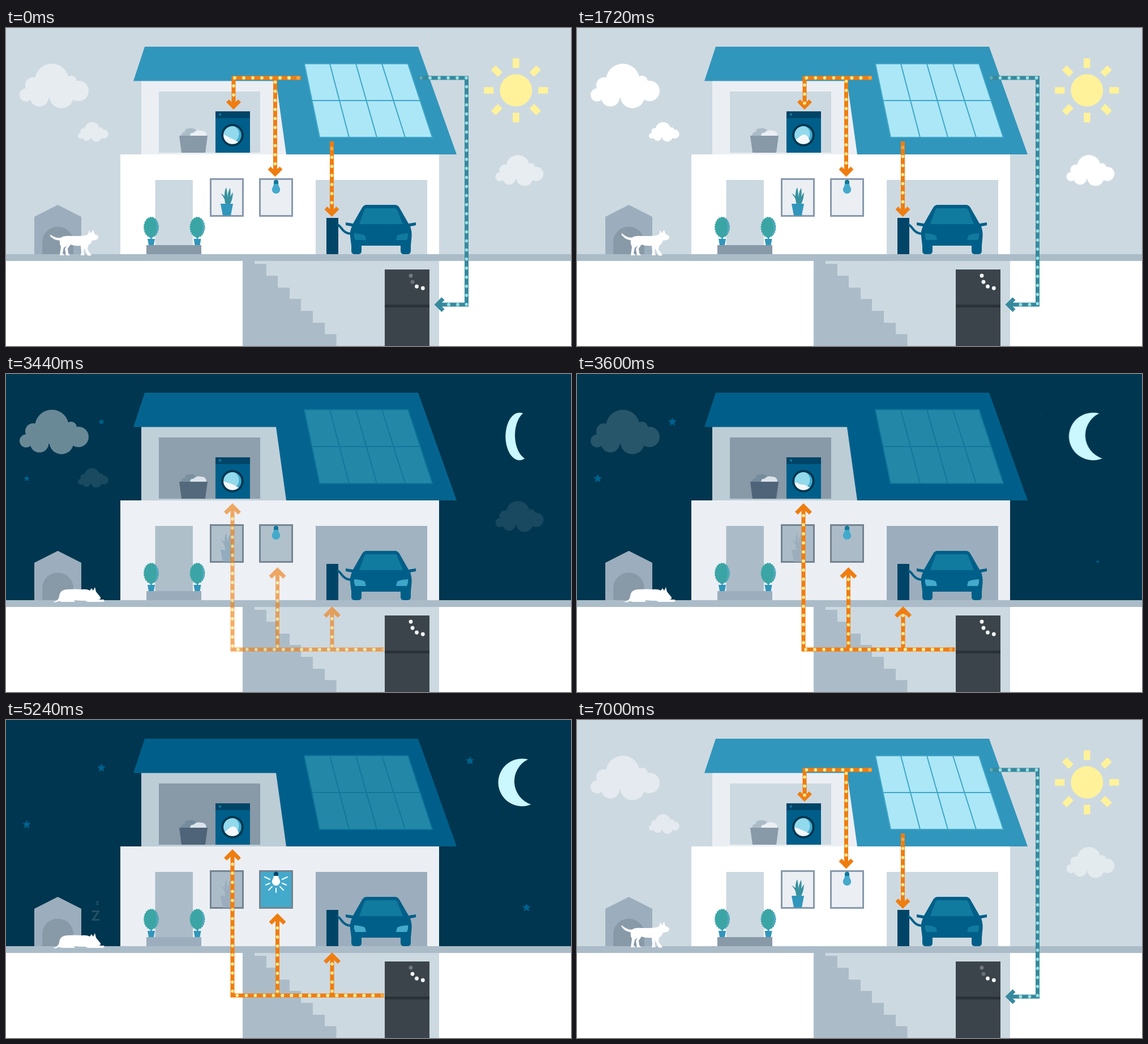
These frames come from a looping animation (998x561 px, 7.04 s). An HTML page without scripts:

```html
<!DOCTYPE html>
<html lang="en">
<head>
<meta charset="utf-8">
<title>Solar house, day and night</title>
<style>
html, body { margin: 0; width: 100%; height: 100%; overflow: hidden; background: #fff; }
svg { display: block; width: 100vw; height: 100vh; }

/* --d / --k: day and night fill, --ds / --ks: day and night stroke */
.sky, .tint, .edge, .panel, .cloud, .day, .night, .stand, .lie, .lit,
.sun, .moon, .star, .stars, .early, .z, .l1, .l2 { animation: 7.04s linear infinite both; }
.sky { animation-name: sky; }
.tint { animation-name: tint; }
.edge { animation-name: tint, edge; }
.panel { animation-name: panel; }
.cloud { animation-name: cloud; }
.cloud.quick { animation-name: quick; }
.day { animation-name: day; }
.night { animation-name: night; }
.stand { animation-name: stand; }
.lie { animation-name: lie; }
.lit { animation-name: lit; }
.sun { animation-name: sun; transform-origin: 900.5px 110px; }
.moon { animation-name: moon; transform-origin: 900.5px 110px; }
.star { animation-name: pop; }
.stars { animation-name: dawn; }
.early { animation-name: early; }
.z { animation-name: doze; }
.l1 { animation-name: led1; }
.l2 { animation-name: led2; }

@keyframes sky { 0%, 43.2% { fill: #cdd9e1; } 47.7%, 89.2% { fill: #00364f; } 92.4%, 100% { fill: #cdd9e1; } }
@keyframes tint { 0%, 43.75% { fill: var(--d); } 49.4%, 90.9% { fill: var(--k); } 96%, 100% { fill: var(--d); } }
@keyframes edge { 0%, 43.75% { stroke: var(--ds); } 49.4%, 90.9% { stroke: var(--ks); } 96%, 100% { stroke: var(--ds); } }
@keyframes panel {
  0%, 43.2% { fill: #ace7f7; stroke: #3fa6c8; }
  48.5%, 87.5% { fill: #2387a8; stroke: #10789c; }
  89.6%, 90.4% { fill: #43aacc; stroke: #2387a8; }
  95%, 100% { fill: #ace7f7; stroke: #3fa6c8; }
}
@keyframes cloud { 0% { opacity: .52; } 5.1%, 43.75% { opacity: 1; } 52.5%, 94.3% { opacity: 0; } 100% { opacity: .52; } }
@keyframes quick { 0% { opacity: .52; } 5.1%, 43.2% { opacity: 1; } 49.5%, 94.3% { opacity: 0; } 100% { opacity: .52; } }
@keyframes day { 0%, 43.2% { opacity: 1; } 46%, 94.3% { opacity: 0; } 98%, 100% { opacity: 1; } }
@keyframes night { 0%, 46.5% { opacity: 0; } 50.2%, 90.2% { opacity: 1; } 93.2%, 100% { opacity: 0; } }
@keyframes stand { 0%, 45.5% { opacity: 1; } 46.6%, 93.2% { opacity: 0; } 94.3%, 100% { opacity: 1; } }
@keyframes lie { 0%, 45.5% { opacity: 0; } 46.6%, 93.2% { opacity: 1; } 94.3%, 100% { opacity: 0; } }
@keyframes lit { 0%, 56.2% { opacity: 0; } 57.4%, 92% { opacity: 1; } 93.2%, 100% { opacity: 0; } }
@keyframes sun { 0%, 43.2% { transform: none; } 46.6%, 90.5% { transform: scaleX(0); } 95.5%, 100% { transform: none; } }
@keyframes moon {
  0%, 46.6% { transform: scaleX(0); }
  50.6% { transform: scaleX(1.03); }
  52%, 87.5% { transform: none; }
  90.5%, 100% { transform: scaleX(0); }
}
@keyframes pop { 0%, 46.9% { transform: scale(0); } 49.7%, 95% { transform: none; } 95.1%, 100% { transform: scale(0); } }
@keyframes dawn { 0%, 90.3% { opacity: 1; } 92.3%, 100% { opacity: 0; } }
@keyframes early { 0%, 87% { opacity: 1; } 89.2%, 100% { opacity: 0; } }
@keyframes doze {
  0%, 60% { opacity: 0; transform: translateY(14px); }
  66% { opacity: .5; }
  74.4% { opacity: .14; transform: none; }
  78%, 100% { opacity: 0; transform: translateY(-8px); }
}
@keyframes led1 { 0%, 16.5% { opacity: .3; } 17.6%, 63% { opacity: 1; } 65%, 100% { opacity: .3; } }
@keyframes led2 { 0%, 8% { opacity: .25; } 9.5%, 80% { opacity: 1; } 82%, 100% { opacity: .25; } }

.wire { fill: none; stroke: #ef7d10; stroke-width: 7; }
.teal .wire { stroke: #378a9e; }
.dots {
  fill: none; stroke: #fde88e; stroke-width: 5.8; stroke-linecap: round; stroke-dasharray: 0 16;
  animation: flow .44s linear infinite;
}
.teal .dots { stroke: #98dfe4; }
.fade { opacity: .6; }
@keyframes flow { from { stroke-dashoffset: var(--o); } to { stroke-dashoffset: calc(var(--o) - 16px); } }

.tail { transform-origin: 98px 371px; animation: wag .176s -.06s ease-in-out infinite alternate; }
@keyframes wag { from { transform: rotate(15deg); } to { transform: rotate(-17deg); } }

.wash { animation: wash 1.17333s linear infinite; }
@keyframes wash {
  0%, 100% { d: path("M383 188C390 190 393 193 398 195C403 197 408 200 417 204V212H383Z"); }
  6.8% { d: path("M383 191C388 190 392 195 398 195C404 195 408 200 417 202V212H383Z"); }
  38.6% { d: path("M383 204C390 204 392 190 402 188C408 187 409 198 411 210V212H383Z"); }
  46.6% { d: path("M383 200C390 196 393 190 400 188C407 187 410 195 413 206V212H383Z"); }
  55.7% { d: path("M383 199C390 197 393 188 400 188C407 188 410 197 417 199V212H383Z"); }
}
</style>
</head>
<body>
<svg viewBox="0 0 998 561" preserveAspectRatio="none">
<defs>
  <g id="cloud">
    <circle cx="57" cy="30" r="30"/><circle cx="24" cy="38" r="14"/><circle cx="11.5" cy="55" r="11.5"/>
    <circle cx="35" cy="59" r="16.5"/><circle cx="74" cy="57" r="21.5"/><circle cx="104" cy="48" r="18"/>
    <circle cx="91" cy="31" r="10"/><path d="M20 34H100V60H14Z"/>
  </g>
  <path id="star" d="M0-8 2.2-2.9 7.6-2.5 3.5 1.1 4.7 6.5 0 3.7-4.7 6.5-3.5 1.1-7.6-2.5-2.2-2.9Z"/>
  <rect id="ray" x="895" y="53.5" width="11.5" height="17"/>
  <g id="tree">
    <g class="edge" style="--d:#3ba5a5;--k:#8899a8;--ds:#3ba5a5;--ks:#8899a8">
      <ellipse rx="12" ry="17" cy="351.5"/>
      <ellipse rx="12" ry="17" cy="351.5" stroke-width="3.4" stroke-linecap="round" stroke-dasharray="0 4.2"/>
    </g>
    <path class="edge" style="--d:#55a9c0;--k:#9caebd;--ds:#55a9c0;--ks:#9caebd" d="M7 337Q18 351 7 366Q13 351 7 337Z" stroke-width="1.5" stroke-dasharray="2 2"/>
    <path class="tint" style="--d:#3196bb;--k:#8899a8" d="M-1.2 368H1.2V372H6.5L4.5 383H-4.5L-6.5 372H-1.2Z"/>
  </g>
  <clipPath id="drum"><circle cx="400" cy="189" r="15.8"/></clipPath>
</defs>

<rect class="sky" width="998" height="400"/>

<g class="stars" fill="#00628f">
  <g transform="translate(36.500 184.500)"><use class="star" href="#star"/></g>
  <g class="early"><g transform="translate(168.500 84.500)"><use class="star" href="#star"/></g></g>
  <g transform="translate(919.500 331)"><use class="star" href="#star" style="animation-delay:.22s"/></g>
  <g transform="translate(819.500 72)"><use class="star" href="#star" style="animation-delay:.27s"/></g>
</g>

<g fill="#fff">
  <g class="cloud"><use href="#cloud" x="24" y="63"/></g>
  <g class="cloud quick"><use href="#cloud" transform="translate(127 166) scale(.44)"/></g>
  <g class="cloud quick"><use href="#cloud" transform="translate(864.500 224) scale(.695)"/></g>
</g>

<g class="sun" fill="#fff29a">
  <circle cx="900.8" cy="110" r="28.5"/>
  <use href="#ray"/>
  <use href="#ray" transform="rotate(45 900.800 110)"/>
  <use href="#ray" transform="rotate(90 900.800 110)"/>
  <use href="#ray" transform="rotate(135 900.800 110)"/>
  <use href="#ray" transform="rotate(180 900.800 110)"/>
  <use href="#ray" transform="rotate(225 900.800 110)"/>
  <use href="#ray" transform="rotate(270 900.800 110)"/>
  <use href="#ray" transform="rotate(315 900.800 110)"/>
</g>
<path class="moon" fill="#cbf7ff" d="M922 69.500A42 42 0 1 0 927.500 149A43 43 0 0 1 922 69.500Z"/>

<!-- ground and basement -->
<rect y="411" width="998" height="150" fill="#fff"/>
<rect y="399" width="998" height="12" fill="#abbcc8"/>
<rect x="418" y="411" width="347" height="150" fill="#cdd9e1"/>
<path fill="#abbcc8" d="M418 411H439V416H460V437H480V458H501V478H521V499H542V520H563V540H583.500V561H418Z"/>
<rect x="669" y="426" width="79" height="135" fill="#3c444b"/>
<rect x="669" y="488" width="79" height="5" fill="#2a3238"/>
<g fill="#f3f7fa">
  <circle class="l1" cx="715" cy="437" r="3.4"/>
  <circle class="l2" cx="718" cy="448" r="3.4"/>
  <circle cx="725.500" cy="456" r="3.4"/>
  <circle cx="736.300" cy="459" r="3.4"/>
</g>

<!-- kennel -->
<path fill="#9caebd" d="M50 333 91.500 312 133 333V399H50Z"/>
<path fill="#8899a8" d="M64 399V378A27.500 27.500 0 0 1 119 378V399Z"/>

<!-- house -->
<path class="tint" style="--d:#ebeff4;--k:#bccdd6" d="M239 93H479L496 224H239Z"/>
<rect class="tint" style="--d:#cdd9e1;--k:#8899a8" x="270" y="112" width="179" height="108"/>
<rect class="tint" style="--d:#fff;--k:#ebeff4" x="202" y="223" width="563" height="176"/>
<path class="tint" style="--d:#3196bb;--k:#005f8a" d="M245 33H728L796 223H495L477 93.500H225Z"/>
<path class="panel" stroke-width="2" d="M527 63H710L753 193H554ZM541 128H731M572 63 606 193M618 63 655 193M664 63 705 193"/>

<!-- laundry room -->
<path class="tint" style="--d:#abbcc8;--k:#748c9c" d="M309 190Q310 184 316 183Q315 177 324 177Q333 176 336 181L345 190Z"/>
<path class="tint" style="--d:#ebeff4;--k:#dbe3ea" d="M325 190Q326 184 331 185Q336 179 344 181Q354 181 354 190Z"/>
<path class="tint" style="--d:#8899a8;--k:#4f6478" d="M306 190H356L352 220H310Z"/>
<rect x="370" y="147" width="61" height="73" fill="#005f8a"/>
<rect x="370" y="147" width="61" height="12" fill="#004568"/>
<circle cx="378" cy="152.500" r="2.200" fill="#117a9f"/>
<circle cx="400" cy="189" r="19.800" fill="#00364f"/>
<g clip-path="url(#drum)">
  <rect x="383" y="172" width="34" height="34" fill="#43aacc"/>
  <circle cx="396" cy="187" r="15.500" fill="#93d9ec"/>
  <path class="wash" fill="#f4f8fb" d="M383 188C390 190 393 193 398 195C403 197 408 200 417 204V212H383Z"/>
</g>

<!-- entrance -->
<rect class="tint" style="--d:#cdd9e1;--k:#abbcc8" x="263.500" y="268" width="66.500" height="116"/>
<rect class="tint" style="--d:#8899a8;--k:#9caebd" x="248" y="383" width="97" height="16"/>
<use href="#tree" x="256.500"/>
<use href="#tree" x="338"/>

<!-- windows -->
<g class="edge" style="--d:#ebeff4;--k:#abbcc8;--ds:#8899ab;--ks:#748390" stroke-width="3">
  <rect x="361.500" y="266.500" width="57" height="65"/>
  <rect x="448.500" y="266.500" width="57" height="65"/>
</g>
<path class="tint" style="--d:#38919f;--k:#9caebd" d="M388 310Q386 298 379 292Q389 295 390 310ZM387 309Q384 290 389 281Q392 294 391 310ZM391 310Q390 292 396 282Q398 296 394 310ZM393 310Q394 298 401 290Q400 304 396 310Z"/>
<path class="tint" style="--d:#3196bb;--k:#9caebd" d="M379 310H401L397 331H383Z"/>
<path id="bulb" fill="#43aacc" d="M473 274H481Q481 278 483 281A7.200 7.200 0 1 1 471 281Q473 278 473 274Z"/>
<path fill="#10789c" d="M473 275V270Q477 265 481 270V275Z"/>
<g class="lit">
  <rect x="450" y="268" width="54" height="62" fill="#43aacc"/>
  <path fill="#fff" d="M473 274H481Q481 278 483 281A7.200 7.200 0 1 1 471 281Q473 278 473 274Z"/>
  <path fill="#004568" d="M473 275V270Q477 265 481 270V275Z"/>
  <path stroke="#fff" stroke-width="2" stroke-linecap="round" d="M477 297V304M470 294 464 300M484 294 490 300M466 288 459 291M488 288 495 291M466 281 457 277M488 281 497 277"/>
</g>

<!-- garage -->
<rect class="tint" style="--d:#cdd9e1;--k:#9caebd" x="547" y="268" width="197" height="131"/>
<rect x="566" y="335" width="21" height="64" fill="#004568"/>
<path d="M585 347C593 348 592 363 612 363" fill="none" stroke="#005f88" stroke-width="4"/>
<path fill="#005f88" d="M637 312H687Q692 312 695 317L711 345 724 343V348L714 350Q717 358 716.500 368L715 384V393Q715 399 709 399H703Q697 399 697 393V384H628V393Q628 399 622 399H616Q610 399 610 393V384L608 368Q607 358 611 350L600 348V343L613 345 629 317Q632 312 637 312Z"/>
<path fill="#117a9f" d="M637 318H687Q690 318 691 321L701 346H624L633 321Q634 318 637 318Z"/>
<path class="tint" style="--d:#117a9f;--k:#43aacc" d="M615 362Q629 363 634 366L636 374H617Q614 368 615 362ZM710 362Q696 363 691 366L689 374H708Q711 368 710 362Z"/>

<!-- dog -->
<g class="stand" fill="#fff">
  <path class="tail" d="M100 369C90 373 84 370 78 367L77 369C83 374 90 377 100 374Z"/>
  <path d="M96 371C101 365 112 367 122 367C132 367 139 367 145 364L147 357 150 362 154 356 156 363 163 367Q164 372 159 374L152 375Q150 381 145 384L144 391 149 398Q152 401 149 401.500H144L138 388 137 396 139 401H132L133 395 132 384Q121 385 114 382L109 389 110 397 113 401H106L104 390 107 384 102 388 100 397 103 401H95L97 386Q93 378 96 371Z"/>
</g>
<g class="lie">
  <path fill="#fff" d="M83 402Q93 400 94 392Q95 381 107 380Q122 379 134 380Q143 379 148 382L151 378 154 382 157 376 159 384 167 394Q168 398 162 398L173 398Q175 401 171 402H144Q140 399 135 400L120 399 122 402H98Q95 400 92 401Q88 404 83 402Z"/>
</g>
<g fill="#fff" font-family="Inter, 'Open Sans', sans-serif" font-weight="700" text-anchor="middle">
  <text class="z" x="158.500" y="354" font-size="24">Z</text>
  <text class="z" x="161.500" y="325" font-size="11" style="animation-delay:.04s">z</text>
</g>

<!-- power by day -->
<g class="day">
  <path class="wire" d="M521 88H402V138M475.500 88V256M575.500 200V326"/>
  <path class="wire" stroke-width="6" d="M391.500 128.500 402 139 412.500 128.500M465 247 475.500 257.500 486 247M565 317.500 575.500 328 586 317.500"/>
  <g style="--o:-5px">
    <path class="dots" d="M521 88H402V134"/>
    <path class="dots" d="M521 88H475.500V251"/>
    <path class="dots" style="--o:-12px" d="M575.500 200V321"/>
  </g>
  <path class="wire fade" d="M521 88H508M575.500 200V214"/>
  <g class="teal">
    <path class="wire" d="M728 88H813.500V488H764M772 477.500 761.500 488 772 498.500"/>
    <path class="dots" style="--o:-5px" d="M728 88H813.500V488H770"/>
    <path class="wire fade" d="M728 88H741"/>
  </g>
</g>

<!-- power by night -->
<g class="night">
  <path class="wire" d="M667.500 486H400V233M479.500 486V346M576 486V415"/>
  <path class="wire" d="M387.500 245.500 400 233 412.500 245.500M467 358.500 479.500 346 492 358.500M563.500 427.500 576 415 588.500 427.500"/>
  <g style="--o:-4.1px">
    <path class="dots" d="M667 486H400V243"/>
    <path class="dots" d="M667 486H479.500V355"/>
    <path class="dots" d="M667 486H576V424"/>
  </g>
  <path class="wire fade" d="M667.500 486H653"/>
</g>
</svg>
</body>
</html>
```
